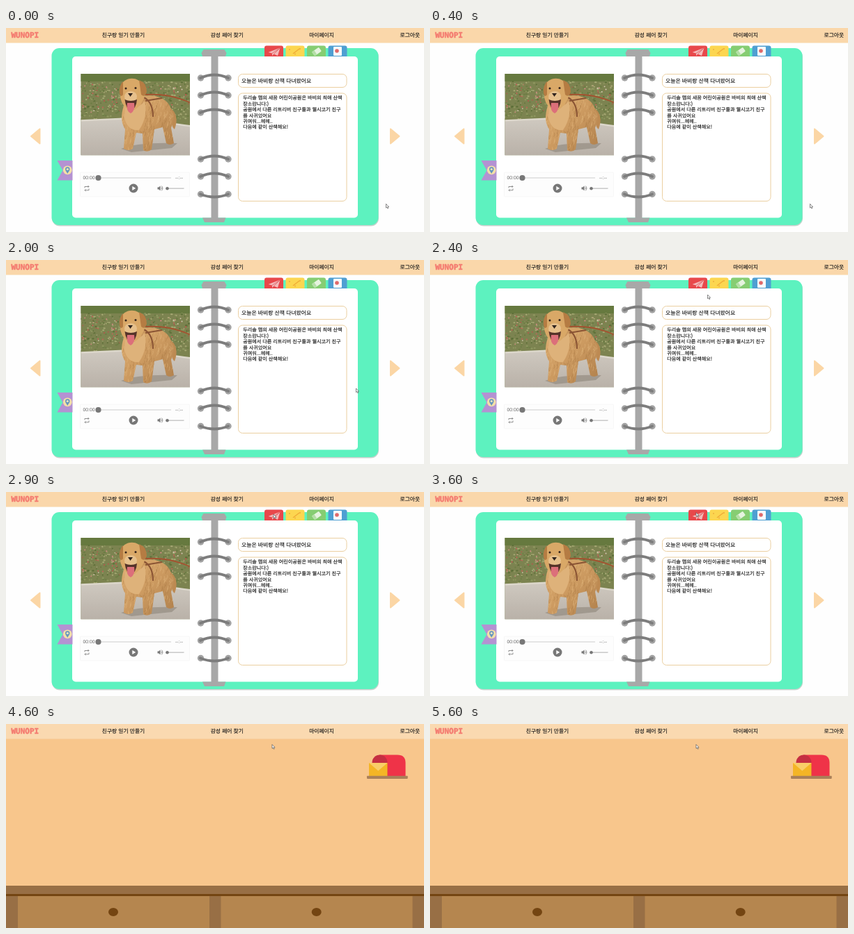
These frames come from a looping animation (600 px wide and 294 px high, 5900 ms). An HTML page:

```html
<!DOCTYPE html>
<html lang="ko">
<head>
<meta charset="utf-8">
<title>Diary</title>
<style>
html, body { margin: 0; width: 100%; height: 100%; overflow: hidden; background: #fff; }
svg { display: block; width: 100vw; height: 100vh; }
text { font-family: 'Noto Sans CJK KR', 'Noto Sans CJK', 'Noto Sans', sans-serif; fill: #1c1c1c; stroke: #1c1c1c; stroke-width: .15; text-rendering: geometricPrecision; }
.nav text { font-size: 7.75px; font-weight: 500; text-anchor: middle; }
.nav .brand { font: bold 11px 'DejaVu Sans Mono', monospace; fill: #f47b70; stroke: #f47b70; stroke-width: .5; stroke-linejoin: round; }
.title { font-size: 7.84px; }
.story { font-size: 7.09px; }
.time { font: 6.8px 'Liberation Sans', sans-serif; fill: #666; stroke: none; }
</style>
</head>
<body>
<svg viewBox="0 0 600 294">
  <defs>
    <clipPath id="photoClip"><rect x="107.5" y="66" width="156.5" height="117.3"/></clipPath>
    <clipPath id="bodyClip"><use href="#body"/></clipPath>
    <linearGradient id="path" x2="0" y2="1"><stop stop-color="#cfc9c0"/><stop offset="1" stop-color="#b9b1a8"/></linearGradient>
    <linearGradient id="fur" x2="1" y2="1"><stop stop-color="#deae72"/><stop offset=".5" stop-color="#cc9a60"/><stop offset="1" stop-color="#b0804c"/></linearGradient>
  </defs>

  <g id="diary">
    <rect width="600" height="294" fill="#fefefe"/>
    <rect x="66" y="30.5" width="469" height="255" rx="11" fill="#c4d2cc"/>
    <rect x="65.5" y="29" width="469" height="255" rx="11" fill="#5df2bf"/>
    <g id="tabs">
      <rect x="371" y="25.5" width="27" height="20" rx="3" fill="#e8484b"/>
      <rect x="401.5" y="25.5" width="27" height="20" rx="3" fill="#fcd650"/>
      <rect x="432" y="25.5" width="27" height="20" rx="3" fill="#86cd72"/>
      <rect x="462.5" y="25.5" width="27" height="20" rx="3" fill="#4f9fd2"/>
      <path d="M376.5 35 393.5 28.5 390 40 384.5 37.5 382 40V36.5Z" fill="#f3b9b9"/>
      <path d="M382 36.5 393 29 384.5 37.5" fill="none" stroke="#dc5a5e" stroke-width=".8"/>
      <path d="M412 37 421 30" stroke="#efaa35" stroke-width="1.2"/>
      <g fill="#eda93c"><circle cx="407" cy="31" r=".9"/><circle cx="415" cy="37.500" r=".9"/><circle cx="422" cy="30" r="1"/></g>
      <g transform="rotate(-35 446 34)"><rect x="440" y="30.500" width="12" height="7" rx="1" fill="#e6f3df"/><rect x="440" y="30.500" width="4" height="7" rx="1" fill="#b4dfa6"/></g>
      <rect x="470" y="27" width="12" height="13" rx="1" fill="#f7fafb"/>
      <circle cx="475" cy="33" r="2.800" fill="#e0696a"/>
    </g>
    <rect x="95" y="41" width="410" height="232.5" rx="5" fill="#fff"/>

    <path d="M73.500 191H95.500V219.500H73.500L81.500 205.200Z" fill="#b492d2"/>
    <circle cx="88.300" cy="204.800" r="6.400" fill="#f3dfa8"/>
    <path d="M88.300 210C86.500 206.500 85.100 205.600 85.100 203.500A3.200 3.200 0 0 1 91.500 203.500C91.500 205.600 90.100 206.500 88.300 210Z" fill="#6596bf"/>
    <circle cx="88.300" cy="203.500" r="1.600" fill="#f5e6bd"/>

    <g fill="#fbd6a5" stroke="#fbd6a5" stroke-width="2" stroke-linejoin="round">
      <path d="M36 156 48.500 145.500V166.500Z"/>
      <path d="M564.500 156 552 145.500V166.500Z"/>
    </g>

    <g clip-path="url(#photoClip)">
      <rect x="107" y="66" width="158" height="118" fill="#7c8350"/>
      <rect x="107" y="66" width="158" height="11" fill="#66793f"/>
      <g id="meadow"></g>
      <path d="M107 134 185 130 265 142V184H107Z" fill="url(#path)"/>
      <path d="M107 133.500 185 130 265 141.500" fill="none" stroke="#dcd7cb" stroke-width="2.500"/>
      <path d="M165 174Q190 164 246 166L238 173 180 179Z" fill="#8e857b" opacity=".6"/>
      <path d="M200 96Q236 94 265 108" fill="none" stroke="#a4522f" stroke-width="1.800"/>
      <path d="M234 114Q250 124 242 146Q238 144 237 132Z" fill="#bd8a52"/>
      <path id="body" d="M196 98C215 95 233 102 237 117C243 126 240 137 237 144L241 166Q235 170 230 166L225 143 213 146 209 175Q203 180 197 176L196 152 187 151 182 174Q176 178 169 174L171 146C163 134 166 119 171 107Z" fill="url(#fur)"/>
      <g id="hair" clip-path="url(#bodyClip)"></g>
      <path d="M171 110Q186 120 199 106Q204 128 191 147Q175 149 170 130Z" fill="#deb27a"/>
      <path d="M198 100Q211 107 211 128M200 105 224 101" fill="none" stroke="#8a5434" stroke-width="2"/>
      <path d="M165 86C166 70 191 68 196 83L199 99Q190 119 179 119Q167 115 164 100Z" fill="#d9a867"/>
      <path d="M168 77Q162 83 163 94Q165 101 168 96ZM191 75Q202 79 202 92Q199 101 194 96Z" fill="#b57c43"/>
      <ellipse cx="179" cy="99" rx="9" ry="8" fill="#e6c08c"/>
      <path d="M170.500 103Q179 107 188 103Q187 116 179 119Q172 116 170.500 103Z" fill="#553329"/>
      <path d="M174 108H184Q186 119 179 123Q172 120 174 108Z" fill="#dc6f7a"/>
      <path d="M175 94H182L178.500 99Z" fill="#30241f"/>
      <circle cx="172" cy="87" r="1.500" fill="#33231b"/><circle cx="186" cy="86.500" r="1.500" fill="#33231b"/>
    </g>

    <rect x="106.500" y="208" width="157" height="35" rx="1" fill="#fdfdfd" stroke="#f4f4f4" stroke-width=".7"/>
    <text class="time" x="110.500" y="218.200">00:00</text>
    <text class="time" x="243" y="218.200">--:--</text>
    <path d="M133 216H237" stroke="#dedede" stroke-width="1.600"/>
    <path d="M231 231.200H255.500" stroke="#bcbcbc" stroke-width="1.200"/>
    <g fill="#777">
      <circle cx="132.500" cy="216" r="4.100"/><circle cx="231.500" cy="231.200" r="2.300"/><circle cx="183" cy="231" r="6.500"/>
      <path d="M217.500 229.500H219.300L221.500 227.500V234.500L219.300 232.500H217.500Z"/>
    </g>
    <path d="M181.300 228 186.200 231 181.300 234Z" fill="#fff"/>
    <path d="M222.800 229.500Q224 231 222.800 232.500M223.300 227.600Q226.500 231 223.300 234.400M113 230.500V228.500H119M117.500 227 119 228.500 117.500 230M119 231.500V233.800H113M114.500 232.300 113 233.800 114.500 235.300" fill="none" stroke="#777" stroke-width=".8"/>

    <path d="M283.500 31H313.500L316.500 36 315 41H282L280.500 36ZM282 273.500H315.500L313 280H285Z" fill="#a8a8a8"/>
    <rect x="294.500" y="31" width="10" height="249" fill="#a8a8a8"/>
    <g id="rings"></g>

    <g fill="#fff" stroke="#ebcfa0">
      <rect x="333.500" y="66.500" width="155.500" height="19" rx="6"/>
      <rect x="333.500" y="94" width="155.500" height="155.500" rx="6"/>
    </g>
    <text class="title" x="338" y="79.300">오늘은 바비랑 산책 다녀왔어요</text>
    <g id="story" class="story"></g>
  </g>

  <g id="desk">
    <rect width="600" height="294" fill="#f8c68c"/>
    <rect y="233" width="600" height="61" fill="#986f45"/>
    <path d="M17 248H292V294H17ZM308.500 248H583.500V294H308.500Z" fill="#b5864f"/>
    <rect y="245" width="600" height="3" fill="#744512"/>
    <ellipse cx="154" cy="271" rx="7" ry="5.900" fill="#744512"/>
    <ellipse cx="445.700" cy="271" rx="7" ry="5.900" fill="#744512"/>
    <path d="M536 44.500H562Q573.500 44.500 573.500 56V75H536Z" fill="#ef3348"/>
    <path d="M525.500 75V55.500A11 11 0 0 1 547.500 55.500V75Z" fill="#c52f42"/>
    <rect x="521" y="56" width="26.500" height="19" fill="#f4b526"/>
    <path d="M521 56H547.500L534.300 67.500Z" fill="#f9cd68"/>
    <rect x="518" y="74.700" width="58.700" height="4.200" rx=".8" fill="#aa8059"/>
  </g>

  <g class="nav">
    <rect id="bar" width="600" height="21.500" fill="#fad7aa"/>
    <text class="brand" x="27.300" y="14.300">WUNOPI</text>
    <text x="168.500" y="12.600">친구랑 일기 만들기</text>
    <text x="317.300" y="12.600">감성 페어 찾기</text>
    <text x="453" y="12.600">마이페이지</text>
    <text x="579.800" y="12.600">로그아웃</text>
  </g>
  <path id="cursor" d="M0 0V5.700L1.300 4.600 2.300 6.700 3.300 6.200 2.400 4.200H4Z" fill="#fff" stroke="#555" stroke-width=".7"/>
</svg>
<script>
const $ = id => document.getElementById(id);
const LOOP = 5900, STEP = 100, DESK_AT = 3700;

// The lowest ring bends the other way.
const ring = (y, bend) =>
  `<g transform="translate(299 ${y})"><circle cx="-19.5" r="4.700" fill="#a3a3a3"/><circle cx="20" r="4.700" fill="#a3a3a3"/>
   <path d="M-20 0Q0 ${bend} 20 0" fill="none" stroke="#7d7d7d" stroke-width="4" stroke-linecap="round"/></g>`;
$('rings').innerHTML = [72, 97, 122, 189, 214].map(y => ring(y, -9)).join('') + ring(239.5, 8);

$('story').innerHTML = [
  '두리솔 맵의 새꿈 어린이공원은 바비의 최애 산책',
  '장소랍니다:)',
  '공원에서 다른 리트리버 친구들과 웰시코기 친구',
  '를 사귀었어요',
  '귀여워...헤헤..',
  '다음에 같이 산책해요!'
].map((line, i) => `<text x="340.300" y="${103.2 + i * 8.45}">${line}</text>`).join('');

let seed = 7;
const random = () => (seed = seed * 16807 % 2147483647) / 2147483647;
const between = (a, b) => a + random() * (b - a);
const pick = list => list[Math.floor(random() * list.length)];
const scatter = (count, make) => Array.from({ length: count }, make).join('');

const greens = ['#5d6f38', '#8f9860', '#a4a772', '#6c7d44'];
const blooms = ['#c9605a', '#d58a86', '#d8c8b4', '#b8524a'];
const leaf = () => `<ellipse cx="${between(107, 264)}" cy="${between(77, 136)}" rx="${between(.6, 2)}" ry="1.1" fill="${pick(greens)}"/>`;
const bloom = () => `<circle cx="${between(107, 264)}" cy="${between(80, 124)}" r="${between(.4, 1.1)}" fill="${pick(blooms)}"/>`;
const hair = () => `<path d="M${between(166, 240)} ${between(98, 174)}q1 3 -1 6" fill="none" stroke="${pick(['#e2b77f', '#a87844'])}" stroke-width=".8" opacity=".6"/>`;
$('meadow').innerHTML = scatter(420, leaf) + scatter(130, bloom);
$('hair').innerHTML = scatter(220, hair);

// Pointer stops: time, x, y
const stops = [[0, 545.5, 253.5], [1800, 545.5, 253.5], [2000, 502.5, 185], [2300, 411, 66], [2500, 386, 34], [2900, 384, 32], [3600, 382, 29.5]];
function pointer(t) {
  const i = stops.findIndex(s => s[0] > t);
  if (i < 0) return stops.at(-1).slice(1);
  const [a, b] = [stops[i - 1], stops[i]];
  const k = (t - a[0]) / (b[0] - a[0]);
  return [1, 2].map(n => a[n] + (b[n] - a[n]) * k);
}

function draw(now) {
  const t = Math.floor((now % LOOP) / STEP) * STEP;
  const onDesk = t >= DESK_AT;
  $('diary').style.display = onDesk ? 'none' : '';
  $('desk').style.display = onDesk ? '' : 'none';
  $('bar').setAttribute('fill', onDesk ? '#fad9b0' : '#fad7aa');
  $('cursor').setAttribute('transform', `translate(${pointer(t)})`);
}

const start = performance.now();
function tick() {
  draw(performance.now() - start);
  requestAnimationFrame(tick);
}
tick();
</script>
</body>
</html>
```
